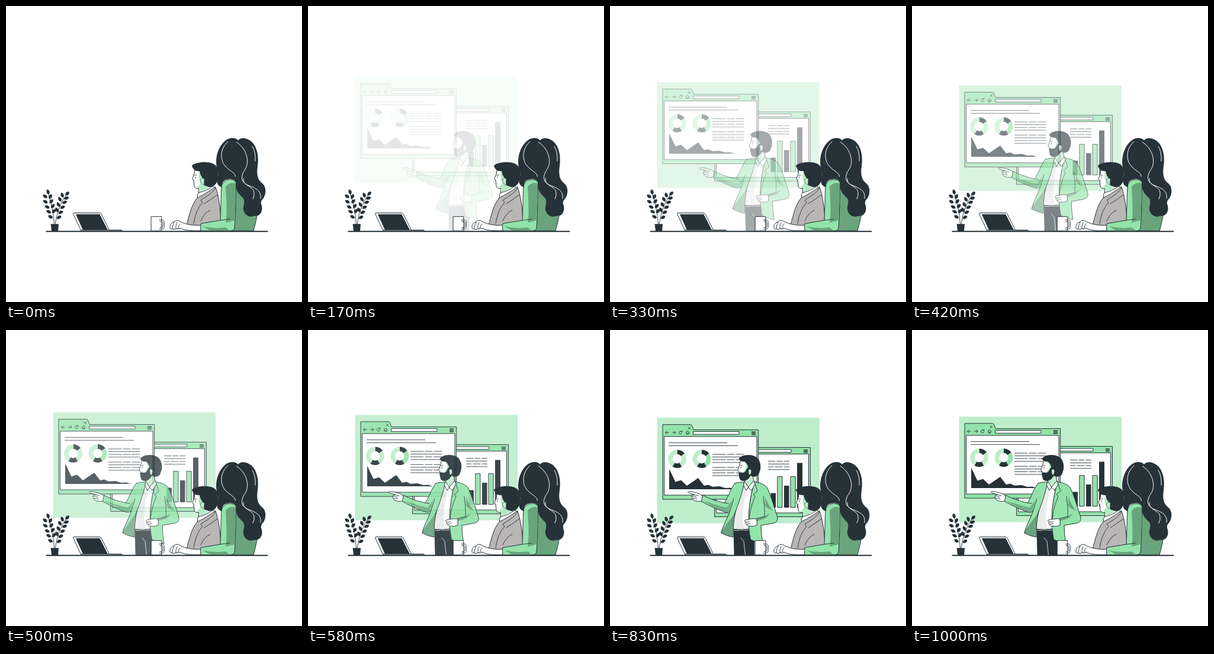
Animation, 500 px wide and 500 px high, one loop 1.04 s. Source, as an HTML page:

```html
<!DOCTYPE html>
<html lang="en">
<head>
<meta charset="utf-8">
<title>Team presentation</title>
<style>
html, body { margin: 0; width: 100%; height: 100%; overflow: hidden; background: #fff; }
svg { display: block; width: 100%; height: 100%; }
svg * { stroke-linecap: round; stroke-linejoin: round; }
.o { stroke: #263238; stroke-width: 1; }
.l { stroke: #263238; stroke-width: .9; fill: none; }
.d { fill: #263238; }
.g { fill: #92e3a9; }
.p { fill: #beeecb; }
.s { fill: #69a47d; }
.w { fill: #fff; }
.e { fill: #b9b6b5; }
.h { stroke: #fff; stroke-width: 1; fill: none; }
</style>
</head>
<body>
<svg viewBox="0 0 500 500">
  <g id="board">
    <path class="p" d="M79.5 146.4H354V324.6H79.5Z"/>

    <!-- rear window -->
    <path class="g o" d="M177 196.5H338.5V313.5H177Z"/>
    <path class="w o" d="M180 207.5H335.5V307H180ZM200 200H306V204.5H200Z"/>
    <path class="l" style="stroke-width:1.3" d="M327.5 200.7H333.5M327.5 202.8H333.5M327.5 204.9H333.5"/>
    <path class="l" d="M267.5 219.7H279M282 219.7H291M294 219.7H302.5M267.5 224.4H302.5M267.5 229.2H276M279 229.2H291M294 229.2H302.5M267.5 233.8H302.5"/>
    <path class="d" d="M271.5 273.5H280V298H271.5ZM294 261H302.5V298H294ZM316 222.5H325V298H316Z"/>
    <path class="g o" d="M283.2 245.7H291V297.5H283.2ZM305.3 245.7H313.2V297.5H305.3Z"/>

    <!-- front window -->
    <path class="g o" d="M89 283.7V157.8H136.5Q138 157.8 138.6 160L141 166.6H250.7V283.7Z"/>
    <path class="w o" d="M92 178H248V277H92ZM141 169.5H218V174.3H141Z"/>
    <path class="l" d="M93.5 171.2H99M96 168.7L93.5 171.2L96 173.7M105.5 171.2H111M108.5 168.7L111 171.2L108.5 173.7M121 169.5A2.6 2.6 0 1 0 121.6 172M121.8 168V170H119.8M128 171.3L131 168.5L134 171.3M129 171V174H133V171M131 174V172.3M132.3 162L135.7 165.4M135.7 162L132.3 165.4"/>
    <path class="l" style="stroke-width:1.4" d="M239.5 170.3H245.5M239.5 172.5H245.5M239.5 174.7H245.5"/>
    <path class="l" d="M99.5 188.5H197.5M99.5 193.4H215.5"/>
    <g id="donuts" fill="none" stroke-width="7.6"></g>
    <path id="copy" class="l"/>
    <path class="d" d="M100 267V232.5L110.5 254.5L120 251.7L130 261L149 248L159 261L166 259.5L173 262.8L185 262L195 265L203 264.5L211 267Z"/>
  </g>

  <g id="speaker">
    <!-- trousers and shirt -->
    <path class="d" d="M210.5 336L211.5 380H246V352L239 335Z"/>
    <path class="h" style="stroke-width:.8" d="M223 351L228 357Q229 368 230.5 380M212 338.5H220M222 338H236"/>
    <path class="w o" d="M228 258C219 283 211 305 210 336.5Q224 338 237 336C235 310 238 285 245 260L235 266Z"/>
    <path d="M228 262C219 285 212 306 210.7 336L229 336C222 315 229 290 233 270Z" fill="#ebebeb"/>
    <!-- left side of jacket, with pointing arm -->
    <path class="w o" d="M158 280C152 275 145 274 136 272.7C133 272.4 132.7 274.6 135.5 275.5L144.5 278.2C140 278 139 281 141 284C142 288.5 148 290.5 158 289Z"/>
    <path class="l" d="M141 280.5Q145 280 148 282.5M141.5 284.3Q146 283.5 149 285.5M144.5 278.2L151 280"/>
    <path class="s o" d="M212 303C203 316 194 328 190 343Q199 348 210 350Q209 325 215 303Z"/>
    <path class="g o" d="M213 259C219 257 224 257 228.5 257C226 275 219 293 213 309C210 318 208 322 205.5 325Q196 331 190 343C193 329 201 318 205 304Q202 309 196 307.5C184 304 170 297 156.5 289.5L158.5 279C171 286 183 289 195 292C202 282 206 267 213 259Z"/>
    <path class="s" d="M161 289C173 292 188 298 199 300L208 288Q207 297 203 304Q200 308 194 306C183 303 171 296 161 289Z" opacity=".8"/>
    <path class="s" d="M212 309C207 320 198 325 190.7 342.5Q200 347 209.6 349C209 335 210 322 212 309Z"/>
    <path class="l" d="M195 292L202 293M205 304L211 285"/>
    <!-- right side of jacket -->
    <path class="g o" d="M246 256.5C254 258 262 260 267 266C273 277 278 295 284.5 315C286 322 284 325 277 326.5L257 330Q257 345 260 361Q249 359 239.5 354C234 328 235 294 246 256.5Z"/>
    <path class="s" d="M258 285L267 300L278 306Q270 298 264 282L265 299ZM250 319.5L264 314L272 310L265 318L249.5 323Z"/>
    <path class="l" d="M261 281Q264 300 263 315L248 319M246 257L251 272L244 278L247 281Q236 305 237 330"/>
    <path class="w o" d="M249.5 319C242 318 236 320 230.5 321Q228 323 232 324.5Q229 327 233 328Q233 332 239 331Q244 333 250 329.7Z"/>
    <path class="l" d="M232 324.5L238 324M233 328L239 327"/>
    <!-- head -->
    <path class="p o" d="M230 250L229 259L235 267L245 257L243 244Z"/>
    <path class="w o" d="M229 256L227.5 262L232 271L235.5 266ZM245 255L247 260L241 271L235.5 266Z"/>
    <path class="w o" d="M223 218C221 225 221 230 217.7 236Q218 238.5 220 239L220 246L230 252L242 240L240 219Z"/>
    <path class="g" d="M228 221L240 220L241 246L231 250L227 240Q233 235 232 228Z" opacity=".75"/>
    <path class="d" d="M219.3 241.5C222 239 226 242 229 240.5C233 237 232 233 236 232L239 247C235 254 228 257 222.5 253.5C219 250 221 246 219.3 241.5Z"/>
    <path class="d" d="M219.5 218C222 211.5 237 208.5 247 213.5C256 217.5 258.5 231 254.5 240Q253 248 244 248L239 246L236 235Q235 227 230 222.5Q223 223 219.5 218Z"/>
    <path class="p o" d="M235.5 236Q240 233 241 238Q241 245 236.5 245Z"/>
    <path class="l" d="M222 229L225 228.5M223 231.5V233.5M220.5 243.5L223 244"/>
  </g>

  <g>
    <!-- seated man -->
    <path class="w o" d="M319 277Q319 284 315 291.5Q315 293.5 317 294L318 304Q319 309 326 308.5L325 319L349 307L340 278Z"/>
    <path class="g" d="M327 279L338 284V305L343 307Q335 312 328 314L327.5 308Q323 308 321.5 306Q328 303 328 297Q323 289 327 279Z" opacity=".7"/>
    <path class="d" d="M314 270C318 263.5 342 261.5 351 267C360 272 359 283 357.5 291C357 301 350 306.5 343 306L335 303L334 292Q329 289 327 279Q317 280 314 270Z"/>
    <path class="p o" style="stroke-width:.6" d="M334 302Q329 300 328.5 294Q330 289 335 292Z"/>
    <path class="l" d="M319 286L322 285.5M320 288.5V290.5"/>
    <path class="w o" d="M326 315L323 319L324 325Q340 318 354 307L349 304.5Q338 313 326 315Z"/>
    <path class="e o" d="M305 371C309 355 313 336 323 324C334 319 344 312 354 305.5C359 320 362 340 363 363L329 371Z"/>
    <path class="l" d="M354 307C348 318 337 322 329 328L332 332Q320 345 317 368M357 319Q346 327 335 334M345 345Q335 349 329 363"/>

    <!-- seated woman -->
    <path class="s o" d="M380 297L412 325L426 342C424 357 421 369 418 380H362L366 305Z"/>
    <path class="w o" d="M330 370C317 371.5 304 369 295 364.5C290 361 285 361.5 284 365C279 365.5 276.5 370 277 374Q277 378 281 376.5Q284 379 287 376Q290 378 293 375C303 380 318 380 330 379.5Z"/>
    <path class="l" d="M284 365Q281 370 281 376M289 366Q286 371 287 376M294 368Q291 371 290.5 375"/>
    <path class="g o" d="M364 304C367 291 386 290 388.5 299C388 328 388 351 386 375Q385 380 377 380H329Q328 373 329 367.5L362 362C363 342 363 322 364 304Z"/>
    <path class="s" d="M371 305Q379 296 388 300C388 324 387 345 386 362L371 366C374 349 372 326 371 305ZM332 372Q350 377 371 374L378 379.5H345Z"/>
    <path class="l" d="M362 362L378 360"/>
    <path class="d" d="M392 227C388 221.5 378 221.5 371 227C360 236 355 250 355 264C355 275 361 280 357 291C354.5 299 359 305 365 306C364 298 368 293 376 292.5C384 291 389 295 389 302C388 312 393 317 399 323C406 329 400 336 401 344C403 354 412 358 419 354.5C427 356 432 350 432.5 343C433 335 429 335 432 328C440 321 441 305 432 299C425 293 423 284 425 271C428 252 423 233 411 226.5C403 222 396 222.5 392 227Z"/>
    <path class="h" d="M375 229C361 241 361 261 371 271C378 279 387 281 387.5 288M389.5 230C405 240 412 260 405 274C396 287 396 296 407 302C420 307 432 311 430 325M401 291C399 304 418 304 419 315Q420 321 417 326M416 237Q422 246 421 262"/>
  </g>

  <!-- desk -->
  <path class="w o" d="M245.5 355.7H262.8V380H245.5Z"/>
  <path class="l" d="M259 361.5H264Q267.3 361.5 267.3 366V372Q267.3 377 263 377H259M260 364.3H263Q265 364.3 265 367V371Q265 374.3 262.5 374.3H260"/>
  <path class="w o" d="M115 349.5H158Q160 349.5 161 351.5L174.5 378.5H195Q197 378.7 196 380H127L113.7 351.5Q113 349.5 115 349.5Z"/>
  <path class="d" d="M117.8 351.8H158.3L171.8 378H129.8Z"/>
  <path class="l" d="M127 378.4H195"/>
  <path class="d" d="M75.5 368.3H89L88 380H77Z"/>
  <path class="l" d="M81.5 369Q80 340 70 313M83 369Q87 338 103 317"/>
  <g id="leaves" class="d"></g>
  <path d="M68.3 380.7H441.5" stroke="#263238" stroke-width="1.9"/>
</svg>
<script>
const $ = id => document.getElementById(id);

const ring = (x, parts) => parts.map(([from, to, color]) =>
  `<circle cx="${x}" cy="215.6" r="11.6" pathLength="360" stroke="${color}" style="stroke-linecap:butt"
    stroke-dasharray="${to - from} 360" transform="rotate(${from - 90} ${x} 215.6)"/>`).join('');
const dark = '#263238', green = '#92e3a9', pale = '#beeecb';
$('donuts').innerHTML =
  ring(113.5, [[0, 55, dark], [55, 150, pale], [150, 212, dark], [212, 360, pale]]) +
  ring(155, [[0, 55, dark], [55, 150, green], [150, 212, dark], [212, 360, pale]]);

$('copy').setAttribute('d', [208, 217.2, 230.2, 239.4].map(y =>
  `M173.5 ${y}H195M198 ${y}H210M213 ${y}H226M173.5 ${y + 4.6}H226`).join(''));

// x, y, angle
const leaves = [
  [71, 314, 75], [66, 321.5, 35], [75, 322, -60], [66.5, 330.5, 30], [76.5, 330, -50],
  [69.5, 339.5, 25], [79, 338, -50], [72, 347.5, 25], [81, 346.5, -50], [75, 356, 30],
  [103.5, 317, -45], [95, 319.5, 70], [102, 324.5, -20], [91, 326.5, 60], [99, 331.5, -20],
  [88.5, 335.5, 60], [95.5, 340, -25], [86, 344.5, 60], [92.5, 348.5, -25], [89.5, 357, -30]
];
$('leaves').innerHTML = leaves.map(([x, y, a]) =>
  `<path d="M-4.5 0C-2 -3.5 2.5 -3.5 4.5 0C2.5 3.5 -2 3.5 -4.5 0Z" transform="translate(${x} ${y}) rotate(${a})"/>`).join('');

// cubic-bezier(.36, -.01, .5, 1.38): ends with a small overshoot
const bezier = (a, b, s) => 3 * (1 - s) ** 2 * s * a + 3 * (1 - s) * s * s * b + s ** 3;
function ease(x) {
  let lo = 0, hi = 1;
  for (let i = 0; i < 24; i++) {
    const mid = (lo + hi) / 2;
    if (bezier(.36, .5, mid) < x) lo = mid; else hi = mid;
  }
  return bezier(-.01, 1.38, lo);
}

const LOOP = 1040, FPS = 24, LEAD = .25, SLIDE = 30;
const start = performance.now();
function draw() {
  const ms = (performance.now() - start) % LOOP;
  const step = Math.floor(ms * FPS / 1000 + .1);
  const p = ease(Math.min((step + LEAD) / FPS, 1));
  const rest = SLIDE * (1 - p);
  const alpha = p < .04 ? 0 : Math.min(p, 1);
  $('board').setAttribute('transform', `translate(0 ${-rest})`);
  $('speaker').setAttribute('transform', `translate(${rest} 0)`);
  for (const id of ['board', 'speaker']) $(id).setAttribute('opacity', alpha);
  requestAnimationFrame(draw);
}
draw();
</script>
</body>
</html>
```
